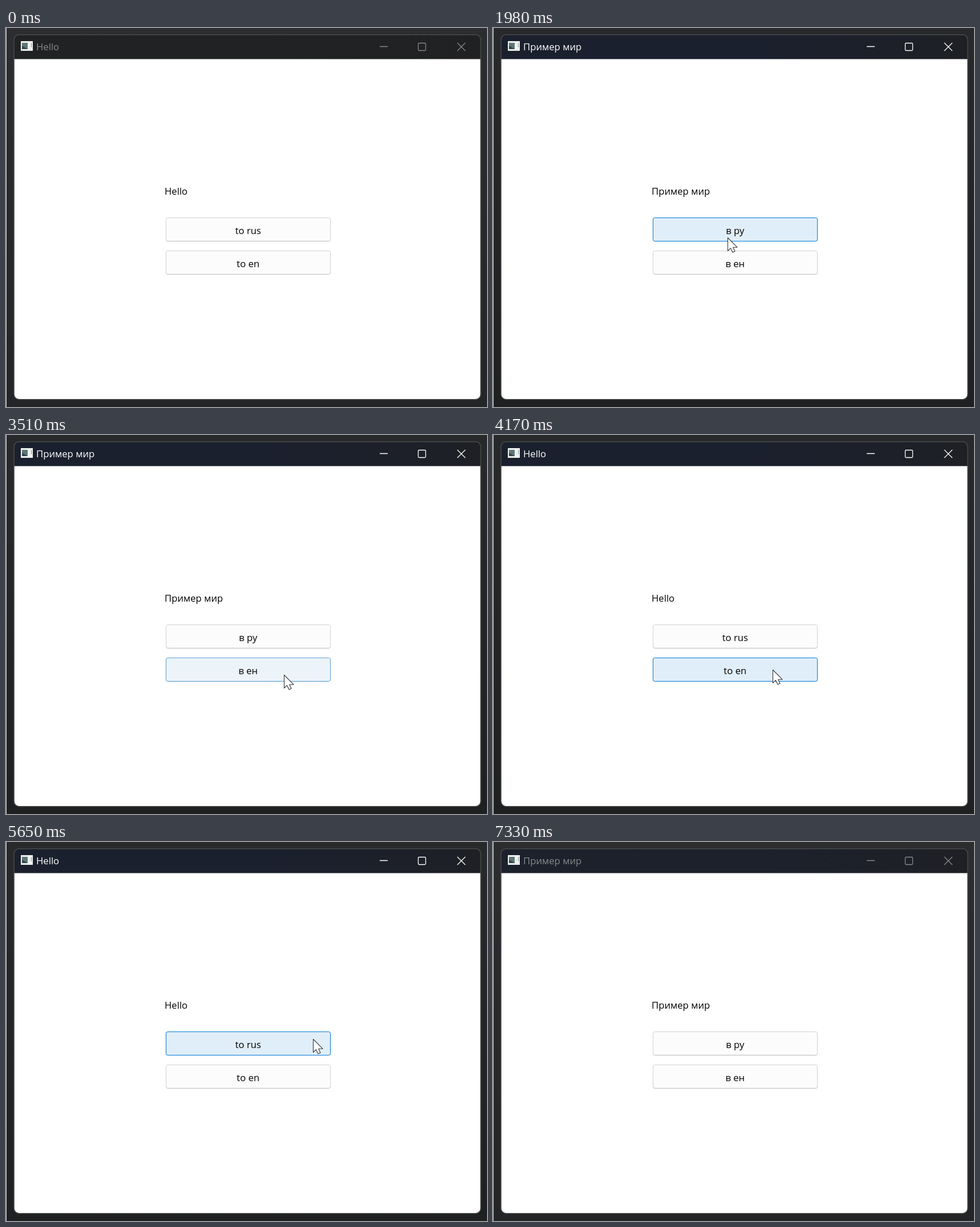
An HTML page for the animation above (7.39 s loop, 843 by 664 pixels).

```html
<!DOCTYPE html>
<html lang="en">
<head>
<meta charset="utf-8">
<title>Hello</title>
<style>
  html, body { margin: 0; width: 100%; height: 100%; overflow: hidden; background: #27292a; }
  svg { display: block; }
  text { font: 16.7px "Open Sans", "Noto Sans", sans-serif; fill: #000; }
  .mid { text-anchor: middle; }
</style>
</head>
<body>
<svg width="843" height="664" viewBox="0 0 843 664">
  <defs>
    <linearGradient id="desk" x2="0" y2="1"><stop/><stop offset="1"/></linearGradient>
    <linearGradient id="bar"><stop offset=".55"/><stop offset="1"/></linearGradient>
    <linearGradient id="edge" x2="0" y2="1">
      <stop offset=".9" stop-color="#d0d0d0"/><stop offset="1" stop-color="#b9b9b9"/>
    </linearGradient>
    <clipPath id="win"><rect x="14" y="12" width="818" height="638.7" rx="9"/></clipPath>
  </defs>

  <rect width="843" height="664" fill="url(#desk)"/>
  <rect width="1" height="664" fill="#d8d8d8"/>
  <g clip-path="url(#win)">
    <rect x="14" y="11" width="819" height="44" fill="url(#bar)"/>
    <rect x="14" y="54.5" width="819" height="600" fill="#fff"/>
  </g>
  <rect x="14" y="11.7" width="818" height="639" rx="9" fill="none" stroke="#484a4b" stroke-width="1.5"/>

  <rect x="26" y="23" width="21" height="17" fill="#f0f2f1"/>
  <rect x="28" y="26" width="10" height="11" fill="#5d7775"/>
  <path d="M28 37V31L38 37Z" fill="#34464b"/>
  <path d="M44.5 26v8" stroke="#7d9a93"/>

  <text id="title" x="53" y="38.8"></text>
  <g id="controls" fill="none" stroke-width="1.3">
    <path d="M655 32.5h14M791 26l14 14m0-14l-14 14"/>
    <rect x="722.5" y="26.5" width="13" height="13" rx="1.5"/>
  </g>

  <text id="label" x="278" y="292"></text>
  <g id="rus" transform="translate(280 332)"></g>
  <g id="en" transform="translate(280 390)"></g>
  <path id="cursor" d="M.5 .5V23.5L5.5 18.7L9 26L13 24.2L9.8 17.2H17Z" fill="#fff" stroke="#33363c" stroke-width="1.1" stroke-linejoin="round"/>
</svg>
<script>
const LOOP = 7390, STEP = 65.4;
const FADE_IN = 250, FADE_OUT = 420;
const $ = id => document.getElementById(id);

const start = [813, 593];
const moves = [
  { from: 790, to: 1450, end: [411, 367] },
  { from: 2320, to: 2860, end: [754, 293] },
  { from: 2860, to: 3040, end: [650, 370] },
  { from: 3110, to: 3510, end: [487, 420] },
  { from: 3510, to: 3780, end: [490, 411] },
  { from: 4790, to: 5050, end: [520, 388] },
  { from: 5050, to: 5520, end: [538, 345] },
  { from: 6320, to: 6450, end: [562, 371] },
  { from: 6450, to: 6920, end: [783, 638] }
];
const clicks = [
  { button: "rus", down: 1715, up: 1910 },
  { button: "en", down: 3980, up: 4170 },
  { button: "rus", down: 5920, up: 6050 }
];
const tops = { rus: 332, en: 390 };
const words = { en: ["Hello", "to rus", "to en"], rus: ["Пример мир", "в ру", "в ен"] };

const clamp = v => Math.max(0, Math.min(1, v));
const mix = (a, b, k) => a + (b - a) * k;
const blend = (a, b, k) => `rgb(${a.map((v, i) => Math.round(mix(v, b[i], k)))})`;

for (const id in tops) {
  const frame = 'x=".5" y=".5" width="288" height="41" rx="3"';
  $(id).innerHTML = `<rect ${frame} fill="#fcfcfc" stroke="url(#edge)"/><rect ${frame}/>
    <text class="mid" x="144.3" y="28.6"></text>`;
}

function cursorAt(t) {
  let pos = start;
  for (const { from, to, end } of moves) {
    if (t < from) break;
    const held = Math.floor((t - from) / STEP + .02) * STEP;
    const k = t >= to ? 1 : clamp(held / (to - from));
    pos = pos.map((v, i) => mix(v, end[i], k));
  }
  return pos;
}

// Hover fades in while the cursor is over a button and out after it leaves.
function hoverAt(t) {
  const hover = { rus: 0, en: 0 }, dt = 10;
  for (let s = 0; s < t; s += dt) {
    const [x, y] = cursorAt(s);
    for (const id in tops) {
      const inside = x > 280 && x < 569 && y > tops[id] && y < tops[id] + 42;
      hover[id] = clamp(hover[id] + (inside ? dt / FADE_IN : -dt / FADE_OUT));
    }
  }
  return hover;
}

function drawButton(id, hover, pressed, text) {
  const [, tint, label] = $(id).children;
  tint.setAttribute("fill", pressed ? "#cce4f7" : "#e0eef9");
  tint.setAttribute("stroke", pressed ? "#005499" : "#0078d4");
  tint.setAttribute("opacity", hover);
  label.textContent = text;
}

function setStops(id, ...colors) {
  colors.forEach((c, i) => $(id).children[i].setAttribute("stop-color", c));
}

function draw(t) {
  const ended = t >= 7330;
  const active = ended ? 0 : clamp((t - clicks[0].down) / 200);
  const blue = ended ? .75 : active;
  const ink = blend([136, 137, 138], [255, 255, 255], active);
  const lang = clicks.findLast(c => t >= c.up)?.button ?? "en";
  const [hello, ...captions] = words[lang];

  $("title").textContent = $("label").textContent = hello;
  $("title").style.fill = ink;
  $("controls").setAttribute("stroke", ink);
  setStops("desk", blend([44, 45, 47], [40, 41, 43], active), blend([36, 37, 38], [30, 32, 33], active));
  setStops("bar", blend([32, 34, 36], [27, 32, 46], blue), blend([32, 33, 35], [30, 32, 37], blue));

  const hover = hoverAt(t);
  Object.keys(tops).forEach((id, i) => {
    const pressed = clicks.some(c => c.button === id && t >= c.down && t < c.up);
    drawButton(id, hover[id], pressed, captions[i]);
  });

  $("cursor").setAttribute("transform", `translate(${cursorAt(t)})`);
  $("cursor").setAttribute("visibility", t >= 790 && t < 6985 ? "visible" : "hidden");
}

function tick() {
  draw(performance.now() % LOOP);
  requestAnimationFrame(tick);
}
tick();
</script>
</body>
</html>
```
